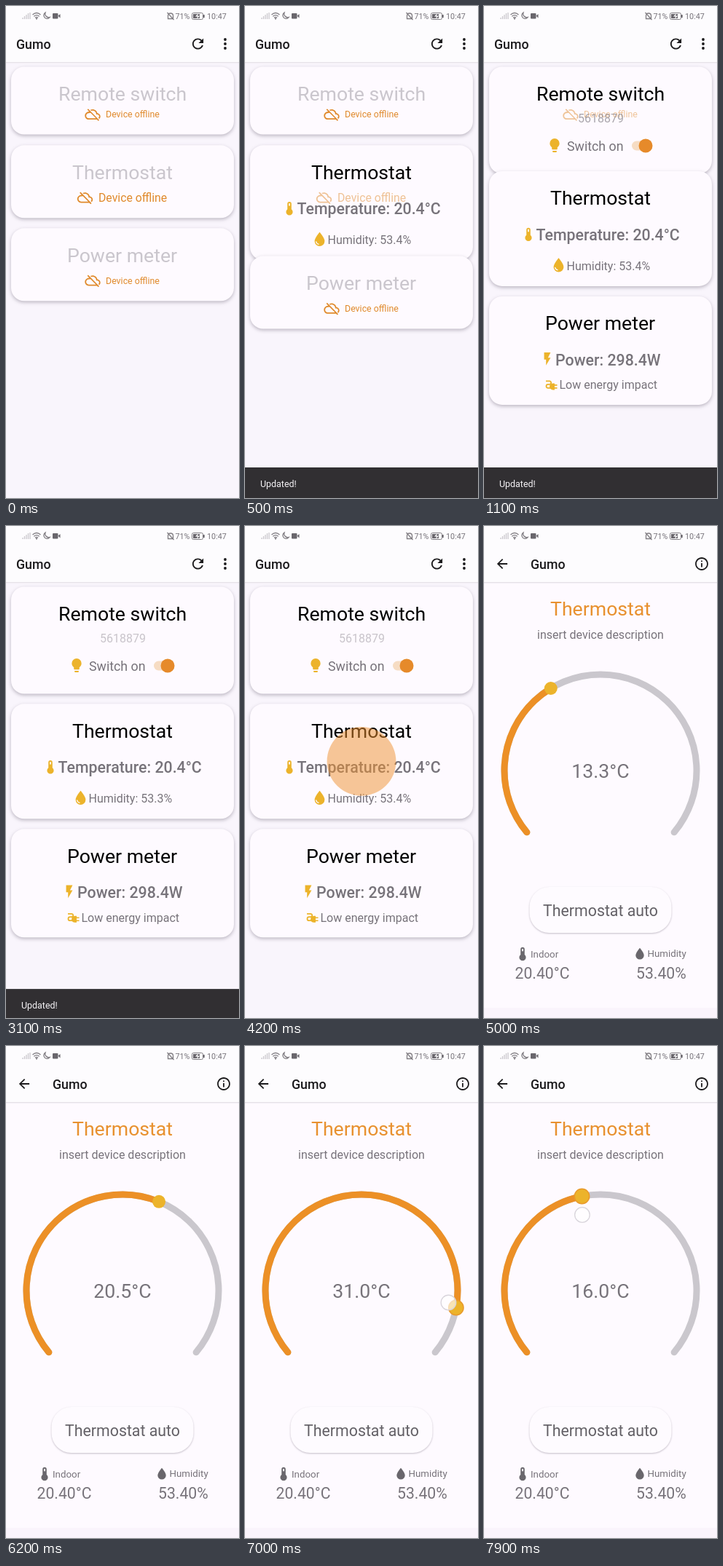
Animation, 320 px wide and 676 px high, one loop 8000 ms. Source, as an HTML page:

```html
<!DOCTYPE html>
<html lang="en">
<head>
<meta charset="utf-8">
<title>Smart home</title>
<style>
html, body { margin: 0; width: 100%; height: 100%; overflow: hidden; background: #fdfcfe; }
svg { display: block; width: 100vw; height: 100vh; font-family: Roboto, sans-serif; }
.card { fill: #fefaff; filter: drop-shadow(0 2px 2.5px rgba(60, 50, 70, .32)); }
.med { font-weight: 500; }
</style>
</head>
<body>
<svg id="stage" viewBox="0 0 320 676"></svg>
<script>
const LOOP = 8000, ORANGE = '#e08a2c', AMBER = '#ecb32b', GREY = '#77737a', INK = '#1b1a1c';
const CX = 160, CY = 336, R = 132, MAX = 35;

const ICONS = {
  cloud: 'M24 15c0-2.64-2.05-4.78-4.65-4.96C18.67 6.59 15.64 4 12 4c-1.33 0-2.57.36-3.65.97l1.49 1.49C10.51 6.17 11.23 6 12 6c3.04 0 5.5 2.46 5.5 5.5v.5H19c1.66 0 3 1.34 3 3 0 .99-.48 1.85-1.21 2.4l1.41 1.41C23.3 17.9 24 16.53 24 15zM3.71 4.56l3.06 3.06h-.42C2.92 7.97 0 10.64 0 14c0 3.31 2.69 6 6 6h12.73l2 2 1.41-1.41L5.12 3.15zM8.73 9.59L17.14 18H6c-2.21 0-4-1.79-4-4s1.79-4 4-4z',
  refresh: 'M17.65 6.35C16.2 4.9 14.21 4 12 4c-4.42 0-7.99 3.58-7.99 8s3.57 8 7.99 8c3.73 0 6.84-2.55 7.73-6h-2.08c-.82 2.33-3.04 4-5.65 4-3.31 0-6-2.69-6-6s2.69-6 6-6c1.66 0 3.14.69 4.22 1.78L13 11h7V4z',
  back: 'M20 11H7.83l5.59-5.59L12 4l-8 8 8 8 1.41-1.41L7.83 13H20z',
  info: 'M11 7h2v2h-2zm0 4h2v6h-2zm1-9C6.48 2 2 6.48 2 12s4.48 10 10 10 10-4.48 10-10S17.52 2 12 2zm0 18c-4.41 0-8-3.59-8-8s3.59-8 8-8 8 3.59 8 8-3.59 8-8 8z',
  bulb: 'M12 2A7 7 0 0 0 5 9c0 2.38 1.19 4.47 3 5.74V17a1 1 0 0 0 1 1h6a1 1 0 0 0 1-1v-2.26c1.81-1.27 3-3.36 3-5.74a7 7 0 0 0-7-7M9 21a1 1 0 0 0 1 1h4a1 1 0 0 0 1-1v-1H9z',
  thermo: 'M15 13V5a3 3 0 0 0-6 0v8a5 5 0 1 0 6 0m-3-9a1 1 0 0 1 1 1v3h-2V5a1 1 0 0 1 1-1z',
  drop: 'M12 20a6 6 0 0 1-6-6c0-4 6-10.75 6-10.75S18 10 18 14a6 6 0 0 1-6 6z',
  bolt: 'M7 2v11h3v9l7-12h-4l4-8z'
};

const text = (x, y, size, str, fill = GREY, attrs = '') =>
  `<text x="${x}" y="${y}" font-size="${size}" fill="${fill}" ${attrs}>${str}</text>`;
const icon = (name, x, y, fill, s = .889) =>
  `<path d="${ICONS[name]}" fill="${fill}" transform="translate(${x} ${y}) scale(${s}) translate(-12 -12)"/>`;
const offline = (ix, tx, y, size) =>
  icon('cloud', ix, y, ORANGE) + text(tx, y + size * .34, size, 'Device offline', ORANGE);

// All card contents are placed relative to the card's top edge.
const card = (id, titleX, title, off, on, extra = '') => `<g id="${id}">
  <rect class="card" x="7" width="306" rx="18"/>
  ${text(titleX, 46.5, 26.67, title, '#000', 'class="title"')}
  <g class="off">${off}</g><g class="on">${on}</g>${extra}</g>`;

const bar = `<rect y="0" width="320" height="77" fill="#fdfcfe"/>
  <path d="M0 77.5H320" stroke="#e6e2e8"/><path d="M0 78.5H320" stroke="#f3eff5"/>`;

const status = `<rect width="320" height="27" fill="#fdfcfe"/>
  <g fill="none" stroke="#807d82" stroke-width="1.3">
    <path d="M23 18v-2M25.5 18v-4M28 18v-6M30.5 18v-8M33 18v-9" stroke="#cbc8cd"/>
    <path d="M36.500 12q5.500-5 11 0M38.300 14.300q3.700-3.300 7.400 0M40 16.300q2-1.600 4 0"/>
    <path d="M54 9a4.500 4.500 0 1 0 6 6.500a5 5 0 0 1-6-6.500z"/>
    <path d="M222.500 17.500h7v-4q0-3.500-3.500-3.500t-3.500 3.500zM221.500 9l9 10"/>
    <rect x="255.500" y="9.500" width="15" height="9" rx="2" stroke-width="1"/>
  </g>
  <g fill="#69666c"><circle cx="42" cy="17.500" r="1"/><rect x="64" y="10" width="7.500" height="7.500" rx="1"/>
    <path d="M71.500 13.500l3-2.500v5.500zM271 12h1.700v4H271z"/><rect x="257" y="11" width="9" height="6"/></g>
  <path d="M264 10l-4 4.500h3l-1 3.500 4-4.500h-3z" fill="#fff"/>`
  + text(232.5, 17.5, 10.7, '71%') + text(276, 17.5, 10.8, '10:47');

const remote = card('remote', 72, 'Remote switch', offline(119, 137, 65.5, 12.4),
  text(129, 76, 16, '5618879', GREY, 'id="serial"') + icon('bulb', 97, 108, AMBER, .95) +
  text(114, 115.5, 17.78, 'Switch on') +
  `<rect x="203" y="102" width="26" height="13" rx="6.500" fill="#f6dcc3"/><circle cx="222" cy="108.500" r="9.500" fill="#e68a2a"/>`);

const thermostat = card('thermostat', 91, 'Thermostat', offline(108.5, 127, 72, 15.8),
  icon('thermo', 61, 87, AMBER, .92) + text(71.5, 95, 21.33, 'Temperature: 20.4°C', GREY, 'class="med"') +
  icon('drop', 102.5, 129.5, AMBER, 1.15) +
  '<path d="M97.500 132a5 5 0 0 0 4 4" fill="none" stroke="#fefaff" stroke-width="1.200"/>' +
  text(113.5, 136, 16, '', GREY, 'id="humidity"'),
  `<clipPath id="clip"><rect x="7" width="306" height="158" rx="18"/></clipPath>
   <circle id="ripple" cx="160" cy="79" fill="#ef9230" fill-opacity=".5" clip-path="url(#clip)"/>`);

const power = card('power', 84, 'Power meter', offline(119, 137, 72, 12.4),
  icon('bolt', 87, 86, AMBER) + text(98, 95, 21.33, 'Power: 298.4W', GREY, 'class="med"') +
  `<path d="M85 116.500h5a2.200 2.200 0 0 1 0 4.400h-2a2.500 2.500 0 0 0 0 5h4" fill="none" stroke="${AMBER}" stroke-width="1.800"/>
   <path d="M97 119.500h-2.500a4.500 4.500 0 0 0 0 9H97z" fill="${AMBER}"/>
   <path d="M97 122h3.500M97 126h3.500" stroke="${AMBER}" stroke-width="1.600"/>` +
  text(103.5, 127.5, 16, 'Low energy impact'));

const polar = (deg, r) => {
  const a = deg * Math.PI / 180;
  return [CX + r * Math.cos(a), CY + r * Math.sin(a)];
};
const arc = `M${polar(140, R)}A${R} ${R} 0 1 1 ${polar(400, R)}`;

const detail = `<g id="detail"><rect width="320" height="676" fill="#faf4fc"/>
  <rect y="78" width="320" height="584" fill="#fefaff"/>${bar}
  ${icon('back', 25, 52, INK)}${text(64, 58.5, 17.78, 'Gumo', INK, 'class="med"')}${icon('info', 299, 52, INK)}
  ${text(91, 122.5, 26.67, 'Thermostat', '#e8912f')}${text(73, 154.5, 16, 'insert device description')}
  <g fill="none" stroke-width="9" stroke-linecap="round">
    <path d="${arc}" stroke="#cac7cd"/><path id="fill" d="${arc}" pathLength="${MAX}" stroke="#ec9026"/></g>
  <circle id="knob" fill="${AMBER}" stroke="#e99a2c"/>
  <circle id="finger" r="10.300" fill="#fff" fill-opacity=".65" stroke="#d9d5dc" stroke-width="1.300"/>
  ${text(CX, 345.5, 26.67, '', GREY, 'id="value" text-anchor="middle"')}
  <rect x="62.500" y="496" width="195" height="63" rx="27" fill="#fefbff" style="filter:drop-shadow(0 1px 1px rgba(60,50,70,.3))"/>
  ${text(81, 536, 21.33, 'Thermostat auto', '#646167')}
  ${icon('thermo', 53, 588, '#69666c', .92)}${text(64, 593, 13.33, 'Indoor')}${text(42.5, 622, 21.2, '20.40°C')}
  ${icon('drop', 214, 588, '#69666c', .95)}${text(224.5, 592, 13.33, 'Humidity')}${text(209, 622, 21.2, '53.40%')}</g>`;

const stage = document.getElementById('stage');
stage.innerHTML = `<g id="list"><rect width="320" height="676" fill="#f9f5fc"/>${bar}
  ${text(14, 58.5, 17.78, 'Gumo', INK, 'class="med"')}${icon('refresh', 263.5, 52, INK, .95)}
  <g fill="${INK}"><circle cx="301" cy="46" r="1.900"/><circle cx="301" cy="52" r="1.900"/><circle cx="301" cy="58" r="1.900"/></g>
  ${remote}${thermostat}${power}
  <g id="snack"><rect width="320" height="43" fill="#312f32"/>${text(21, 26.5, 12.44, 'Updated!', '#f4f2f5')}</g></g>
  ${detail}${status}`;

const $ = id => document.getElementById(id);
const set = (el, attrs) => { for (const k in attrs) el.setAttribute(k, attrs[k]); };
const move = (id, x, y) => set($(id), { transform: `translate(${x} ${y})` });
const mix = (a, b, k) => a + (b - a) * k;
const ramp = (t, a, b) => Math.min(1, Math.max(0, (t - a) / (b - a)));
const ease = (t, a, b) => (1 - Math.cos(Math.PI * ramp(t, a, b))) / 2;
const out = (t, a, b) => 1 - (1 - ramp(t, a, b)) ** 3;

// A card grows at once when its device answers; its contents cross-fade.
function drawCard(id, y, t, start, shortH, tallH) {
  const el = $(id), live = t >= start;
  move(id, 0, y);
  set(el.querySelector('.card'), { height: live ? tallH : shortH });
  set(el.querySelector('.title'), { fill: live ? '#000' : '#cac6cd' });
  set(el.querySelector('.off'), { opacity: 1 - ramp(t, start, start + 300) });
  set(el.querySelector('.on'), { opacity: ramp(t, start, start + 120) });
}

function target(t) {
  if (t < 6250) return 20.5 * out(t, 4667, 5800);
  return t < 7050 ? mix(20.5, 31, ease(t, 6250, 7000)) : mix(31, 16, ease(t, 7050, 7900));
}

function draw(t) {
  const pushed = 53 * ease(t, 945, 1200);
  drawCard('remote', 83.5, t, 945, 93, 147);
  drawCard('thermostat', 191.3 + pushed, t, 350, 100, 158);
  drawCard('power', 305.3 + 58 * ease(t, 350, 600) + pushed, t, 600, 100, 149);
  set($('serial'), { 'fill-opacity': mix(.8, .4, ramp(t, 945, 1300)) });
  $('humidity').textContent = `Humidity: ${t >= 2100 && t < 3700 ? 53.3 : 53.4}%`;
  move('snack', 0, 676 - 42 * (ease(t, 50, 300) - ease(t, 3065, 3315)));
  set($('ripple'), { r: 175 * out(t, 4170, 4480) });

  const slide = out(t, 4560, 4860);
  move('list', -80 * slide, 0);
  move('detail', 320 * (1 - slide), 0);

  const v = target(t), angle = 140 + 260 * v / MAX, held = t >= 6250;
  const [kx, ky] = polar(angle, R);
  const [fx, fy] = polar(angle - 2.4, mix(R, 107, ramp(t, 6250, 7900)));
  set($('fill'), { 'stroke-dasharray': `${v} ${2 * MAX}` });
  set($('knob'), { cx: kx, cy: ky, r: held ? 10.2 : 9, 'stroke-width': held ? 1.5 : 0 });
  set($('finger'), { cx: fx, cy: fy, visibility: held ? 'visible' : 'hidden' });
  $('value').textContent = v.toFixed(1) + '°C';
}

const begin = performance.now();
function tick() {
  draw((performance.now() - begin) % LOOP);
  requestAnimationFrame(tick);
}
tick();
</script>
</body>
</html>
```
